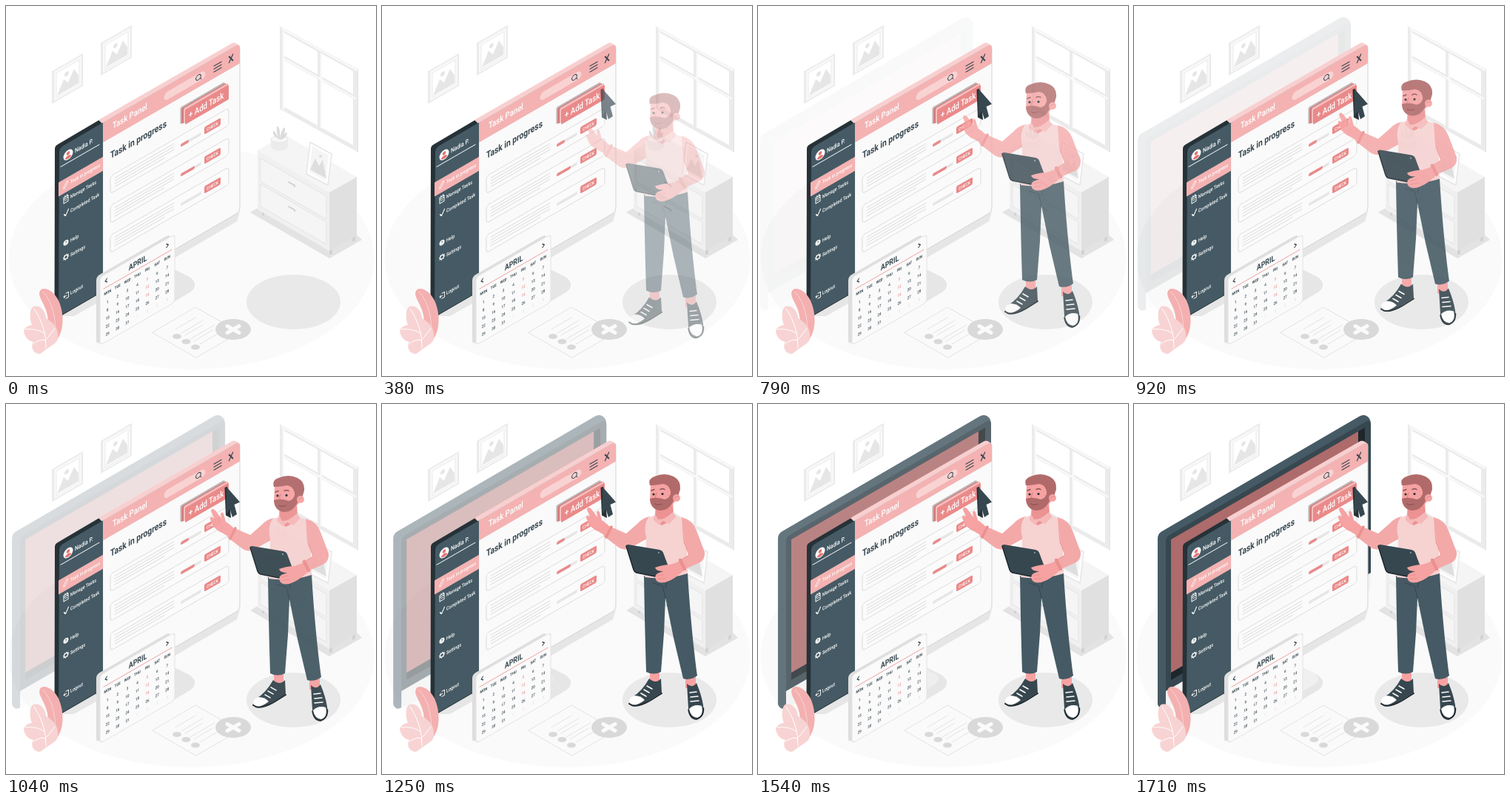
Recreate the animation shown at these times as an HTML page. Size 500 by 500 pixels, loop 1750 ms.

```html
<!DOCTYPE html>
<html lang="en">
<head>
<meta charset="utf-8">
<title>Task panel</title>
<style>
  html, body { margin: 0; width: 100%; height: 100%; overflow: hidden; background: #fff; }
  svg { display: block; width: 100%; height: 100%; }
  text { font-family: Roboto, "Liberation Sans", sans-serif; font-weight: 500; }
</style>
</head>
<body>
<svg viewBox="0 0 500 500" stroke-linecap="round" stroke-linejoin="round">
  <ellipse cx="250.500" cy="341" rx="247" ry="150" fill="#fafafa"/>

  <g id="pictures" transform="skewY(-30)"></g>

  <g id="window" transform="skewY(29)" fill="none" stroke-linejoin="miter">
    <path d="M373-175H472V-69H373ZM424-175V-69M373-138H472" stroke="#ebebeb" stroke-width="6"/>
    <path d="M375-173V-69M426-171V-72M375-137H472M373-176H474" stroke="#fafafa" stroke-width="2.500"/>
    <path d="M475.500-178V-66" stroke="#e3e3e3"/>
  </g>

  <g id="dresser">
    <path d="M330 279L437 341L481 316L474 309L437 329L340 273Z" fill="#e3e3e3"/>
    <path d="M346 276v6l3 2v-6ZM437 330v6l4-1v-6ZM468 312v7l4-2v-7Z" fill="#d2d2d2"/>
    <path d="M340 195L377 174L474 231L437 252Z" fill="#f5f5f5"/>
    <path d="M340 195L437 252V331L340 275Z" fill="#f0f0f0"/>
    <path d="M437 252L474 231V310L437 331Z" fill="#e0e0e0"/>
    <path d="M344 206L433 257V288L344 237ZM344 241L433 292V322L344 271Z" fill="#f5f5f5" stroke="#e4e4e4"/>
    <path d="M382 238l8 4.500v1.500M382 271l8 4.500v1.500" fill="none" stroke="#d0d0d0" stroke-width="2"/>
    <path d="M358 180V189Q360 196 369 196Q379 196 381 189V180Z" fill="#ebebeb"/>
    <ellipse cx="369.500" cy="180" rx="11.500" ry="4.500" fill="#f7f7f7" stroke="#e6e6e6"/>
    <path d="M371 181Q359 176 361 168Q365 171 368 179Q364 164 367 162Q371 166 370 179Q373 164 377 164Q378 172 372 180Q376 170 380 171Q380 178 371 181Z" fill="#dcdcdc"/>
    <path d="M411 184L440 200L435 242L406 227Z" fill="#fff" stroke="#e6e6e6" stroke-width="1.500"/>
    <path d="M414 189L436 202L432 236L410 224Z" fill="#f5f5f5"/>
    <path d="M411 221L418 206L423 216L428 208L433 233Z" fill="#dedede"/>
    <circle cx="425" cy="203" r="2" fill="#dedede"/>
  </g>

  <ellipse cx="388.500" cy="400" rx="63.500" ry="37" fill="#e9e9e9"/>

  <g id="sheet" fill="none" stroke="#e3e3e3">
    <path d="M198 441L256 407L316 441L257 475Z" fill="#fafafa"/>
    <path d="M237 442L266 425M249 450L282 431M262 457L291 440M242 445L266 431M254 453L279 438M229 437L256 421"/>
    <g fill="#d9d9d9" stroke="none">
      <ellipse cx="231" cy="446.500" rx="6" ry="3.600"/>
      <ellipse cx="243.500" cy="453.500" rx="6" ry="3.600"/>
      <ellipse cx="256" cy="461" rx="6" ry="3.600"/>
      <ellipse cx="307" cy="437" rx="24" ry="14"/>
    </g>
    <path d="M299 432.500L315 441.500M315 432.500L299 441.500" stroke="#fafafa" stroke-width="5"/>
  </g>

  <path d="M72 419L316 278L312 291L150 386L92 419Z" fill="#e6e6e6"/>
  <path d="M215 350L246 365Q262 375 250 386L215 407Z" fill="#e6e6e6"/>

  <g id="monitor">
    <path d="M228 357L244 364Q254 371 244 379L228 388Z" fill="#f0f0f0"/>
    <path d="M32 182Q32 175.500 37 172.500L304 17Q309 14 313 15.500Q320 18.500 320 27V240L43 410Q36 415 32 406Z" fill="#455a64"/>
    <path d="M43 185Q43 180 48 177L313 24Q320 20 320 28V230L43 390Z" fill="#37474f"/>
    <path d="M43 388L320 228V246Q320 252 316 255L43 412Z" fill="#f3f3f3"/>
    <path d="M50 183L312 32V222L50 373Z" fill="#1c262b"/>
    <path d="M50 183L303 37V217L50 363Z" fill="#ad6b6b"/>
  </g>

  <g id="panel">
    <path d="M66 193Q66 189 70 187L126 154L131 157V386L74 419Q66 422 65.500 414Z" fill="#263238"/>
    <path d="M125 154L306 50Q309 49 312 51L316 54L131 160Z" fill="#f9cfcf"/>
    <path d="M131 157.500L310 54Q316 51 316 57V272Q316 278 311 281L131 385Z" fill="#fafafa" stroke="#cfd3d5"/>
    <path d="M131 157.500L310 54Q316 51 316 57V77.500L131 184.500Z" fill="#f4b2b2"/>
    <path d="M72 198Q72 192 77 189L131 157.500V385L79 415Q72 419 71 412Z" fill="#455a64"/>
    <g id="ui" transform="skewY(-30)"></g>
  </g>

  <g id="plant">
    <path d="M62 458C79 446 80 418 71 398C64 383 49 378 46 385C42 393 53 402 56 418Q59 436 56 460Z" fill="#f4b0b0"/>
    <path d="M50 386Q70 408 66 452" fill="none" stroke="#f9d3d3"/>
    <path d="M37 406C45 403 54 412 54 422C62 426 70 434 70 444C71 452 68 455 63 458L46 470C36 470 33 460 37 454C28 452 24 445 24 437C28 433 32 431 35 431C32 424 31 410 37 406Z" fill="#f8d3d3"/>
    <path d="M38 409Q55 434 54 463M25 437Q42 435 53 443M66 436L55 450M37 456Q48 449 54 452" fill="none" stroke="#fff"/>
  </g>

  <g id="calendar" transform="skewY(-30)"></g>

  <g id="cursor">
    <path d="M295.500 113L299 111.500L303 143L304 154L297 150.500Z" fill="#263238"/>
    <path d="M298 112L316 132.500L308.500 136L312 149L306 153L302.500 142L297.500 149Z" fill="#37474f"/>
  </g>

  <g id="man">
    <path d="M362 358H375V378H362ZM410 366H424V384H410Z" fill="#f6a2a2"/>
    <g id="shoes">
      <path d="M361 371Q370 379 377 371L378 390L362 400Q345 411 337 408Q331 403 338 396Q351 389 361 371Z" fill="#37474f"/>
      <path d="M334 401Q334 397 341 394Q350 394 355 400Q345 408 337 407Q334 405 334 401Z" fill="#fff"/>
      <path d="M334 405Q343 412 362 401L378 391" fill="none" stroke="#1c262b" stroke-width="2"/>
      <path d="M412 378Q419 385 425 377Q432 394 434 407Q436 422 425 426.500Q415 425 414 411Z" fill="#37474f"/>
      <path d="M415 412Q422 405 432 408Q435 421 426 424Q417 423 415 412Z" fill="#fff"/>
      <path d="M414 413Q416 426 425 426Q435 423 434.500 411" fill="none" stroke="#1c262b" stroke-width="1.500"/>
      <path d="M354 386l7 4M350 391l7 4M358 381l7 4M416 390l9-1M417 396l10-1M417 402l11-1" fill="none" stroke="#fff" stroke-width="1.600"/>
    </g>
    <path d="M354 232L413 228C416 280 421 330 426 367Q417 374 407 371L394 316L383 262L381 310L377 362Q367 367 357 362Q355 300 354 232Z" fill="#455a64"/>
    <path d="M383 262L379 246L366 242M387 232L383 248" fill="none" stroke="#37474f"/>
    <path d="M362 152Q352 154 346 161L330 175L307 165L299 178L320 194Q330 200 340 192L362 180Z" fill="#f4a9a9"/>
    <path d="M302 178L308 166Q302 160 297 157L294 146Q291 142 290 147L291 153L283 142Q278 137 277 143L281 152Q275 149 276 154L280 163Q286 170 292 172Z" fill="#f6a2a2"/>
    <path d="M310 166L303 180" stroke="#ec8f8f" stroke-width="3.500"/>
    <path d="M360 153Q382 146 406 154Q414 170 412 190L413 229Q385 238 355 234Q357 205 357 180Q353 165 360 153Z" fill="#f6d2d1"/>
    <path d="M370 134L393 132L394 150Q385 162 378 164Q369 158 369 150Z" fill="#ec9292"/>
    <path d="M369 148L366 156L374 163L380 158L388 162L398 152L393 146Q383 156 373 156Z" fill="#f5b8b8"/>
    <path d="M330 192Q329 190 333 190L375 197Q379 198 380 201L392 233Q392 237 389 237L344 228Q341 227 340 224Z" fill="#37474f"/>
    <path d="M330 192L340 224Q341 227 344 228L389 237" fill="none" stroke="#1c262b" stroke-width="1.500"/>
    <circle cx="374" cy="201" r="1.200" fill="#78909c"/>
    <path d="M405 153Q420 157 425 171L436 200Q437 211 428 215L405 225L399 214L415 204L407 184Z" fill="#f4a9a9"/>
    <path d="M404 212L409 224Q396 236 388 239Q377 244 371 239Q367 233 372 229L380 226Q370 226 369 221Q380 217 390 217Z" fill="#f6a2a2"/>
    <path d="M372 232l10-2M373 237l10-2" stroke="#ec8f8f"/>
    <path d="M403 211L409 223" stroke="#ec8f8f" stroke-width="4.500"/>
    <path d="M408 186L415 204L402 212" fill="none" stroke="#ec9292"/>
    <g id="head">
      <path d="M363 109Q372 103 388 107L396 118V132Q386 144 375 144Q363 141 362 130Z" fill="#f6a2a2"/>
      <path d="M362 110Q359 101 368 98Q382 92 394 98Q404 103 403 115L400 125L392 131L390 118Q388 109 380 108Q370 110 362 110Z" fill="#b16a6a"/>
      <path d="M362 128Q371 125 382 129Q389 128 391 118L394 131Q388 144 375 144Q363 142 362 128Z" fill="#b16a6a"/>
      <path d="M369 135Q373 138 378 135" fill="none" stroke="#8d5252" stroke-width="1.200"/>
      <circle cx="398" cy="127" r="5" fill="#f6a2a2"/>
      <path d="M396 127q1-3 4-2" fill="none" stroke="#e08585"/>
      <path d="M364 117l4-1.500M376 115.500q3-2 6 0" fill="none" stroke="#8d5252" stroke-width="1.500"/>
      <path d="M371 120l-2 6 3 1" fill="none" stroke="#e58282" stroke-width="1.300"/>
      <circle cx="367" cy="122" r="1.600" fill="#263238"/>
      <circle cx="379" cy="121.500" r="1.600" fill="#263238"/>
    </g>
  </g>
</svg>
<script>
const $ = id => document.getElementById(id);
const DARK = '#37474f', CORAL = '#ea8a8a', PINK = '#f4b2b2';

// All helpers below draw on the skewed wall plane.
const rect = (x, y, w, h, fill, rx = 0, extra = '') =>
  `<rect x="${x}" y="${y}" width="${w}" height="${h}" rx="${rx}" fill="${fill}" ${extra}/>`;
const line = (d, color, w = 1) =>
  `<path d="${d}" fill="none" stroke="${color}" stroke-width="${w}"/>`;
const label = (x, y, s, size, fill = '#fff', anchor = 'start', weight = 500) =>
  `<text transform="translate(${x} ${y}) scale(.8 1)" font-size="${size}" fill="${fill}" ` +
  `text-anchor="${anchor}" style="font-weight:${weight}">${s}</text>`;

function picture(x) {
  return rect(x, 124, 42, 44, '#ebebeb') + rect(x + 3, 126, 37, 40, '#f8f8f8') +
    rect(x + 6, 130, 31, 33, '#fff', 0, 'stroke="#ececec"') +
    `<path d="M${x + 7} 161l9-17 6 8 8-14 6 12v11z" fill="#e6e6e6"/>` +
    `<circle cx="${x + 20}" cy="139" r="3" fill="#e6e6e6"/>`;
}

function card(i) {
  const y = 311.5 + i * 40, done = [9, 17, 0][i];
  let s = rect(141, y, 160, 23.5, '#fbfbfb', 4, 'stroke="#dcdcdc"');
  for (let k = 0; k < 4; k++) s += line(`M147 ${y + 5.5 + k * 4}H${k < 3 ? 227 : 214}`, '#dadada');
  s += line(`M238 ${y + 13.5}H262`, '#e6e6e6', 4);
  if (done) s += line(`M238 ${y + 13.5}h${done - 2}`, CORAL, 4);
  return s + rect(268, y + 7, 22, 10, CORAL, 2) + label(279, y + 14.3, 'CHECK', 6, '#fff', 'middle');
}

function sidebar() {
  return '<circle cx="84" cy="249.500" r="6.500" fill="#fff"/>' +
    `<circle cx="84" cy="247.500" r="2.300" fill="#e57373"/><path d="M79.500 253q4.500-5 9 0q-4.500 4-9 0" fill="#e57373"/>` +
    label(93, 252.5, 'Nadia P.', 8.5) + line('M74 260H126', '#fff') +
    rect(71, 279.5, 60, 19, PINK) +
    label(87, 290.5, 'Task in progress', 6.8) +
    label(87, 310.5, 'Manage Tasks', 6.8) +
    label(87, 329.5, 'Completed Task', 6.8) +
    label(87, 369.5, 'Help', 6.8) +
    label(87, 389, 'Settings', 6.8) +
    label(87, 440.5, 'Logout', 6.8) +
    line('M78 290l4-6 2 1.500-4 6-2 1z', '#fff', .8) +
    line('M78 304h6v8h-6zM78 306.500h6M80 309h2M80 302.500v2M82.500 302.500v2', '#fff', 1) +
    line('M78.500 327l2 3 4-7', '#fff', 1.3) +
    '<circle cx="81" cy="366.500" r="3.500" fill="#fff"/>' + label(81, 369, '?', 6.5, '#455a64', 'middle') +
    '<circle cx="81" cy="386" r="2.600" fill="none" stroke="#fff" stroke-width="1.500"/>' +
    '<circle cx="81" cy="386" r="3.700" fill="none" stroke="#fff" stroke-width="1" stroke-dasharray="1 1.900" stroke-linecap="butt"/>' +
    line('M81 435h3.500v7h-3.500M82 438.500h-4l1.500-1.500M78 438.500l1.500 1.500', '#fff', .9);
}

function board() {
  return label(144, 249.5, 'Task Panel', 12) +
    line('M219 247H264', '#f9d2d2', 11) +
    '<circle cx="260" cy="246.500" r="3.400" fill="none" stroke="#37474f" stroke-width="1"/>' +
    line('M262.400 249l1.600 2', DARK, 1) +
    line('M281 243.300H291M281 247.300H291M281 251.300H291', DARK, 1.3) +
    line('M301.500 242.500l5 8M306.500 242.500l-5 8', DARK, 1.6) +
    label(141, 288, 'Task in progress', 12.8, DARK, 'start', 700) +
    [0, 1, 2].map(card).join('') +
    rect(235.5, 273, 60, 23, '#bdb3b4', 2) + rect(237.5, 275.5, 60, 21, '#d57878', 2) +
    rect(240, 277, 60, 20, '#f6bebe', 2) + rect(242, 280, 59, 20, CORAL, 1.5) +
    label(247, 294.3, '+ Add Task', 12);
}

function calendar() {
  const names = ['MON', 'TUE', 'WED', 'THU', 'FRI', 'SAT', 'SUN'];
  let s = rect(122, 436, 100, 92, '#dedede', 5) +
    rect(127, 440, 101, 92, '#fafafa', 5, 'stroke="#e3e3e3"') +
    label(178, 453.5, 'APRIL', 11, DARK, 'middle', 700) +
    line('M132 458.500H224', '#f0a0a0') +
    line('M136.500 447l-2.500 2.300 2.500 2.300M217 447l2.500 2.300-2.500 2.300', DARK, 1.2);
  names.forEach((n, c) => s += label(137.3 + c * 13.4, 468, n, 5.3, DARK, 'middle', 700));
  for (let i = 0; i < 35; i++) {
    const col = i % 7, row = i / 7 | 0, next = i > 30;
    const color = next ? '#e0e0e0' : col === 4 && row < 3 ? '#f08a8a' : DARK;
    s += label(137.3 + col * 13.4, 481 + row * 10.8, next ? i - 30 : i + 1, 5.5, color, 'middle');
  }
  return s;
}

$('pictures').innerHTML = picture(62) + picture(128);
$('ui').innerHTML = sidebar() + board();
$('calendar').innerHTML = calendar();

const LOOP = 1750;
const clamp = v => Math.min(1, Math.max(0, v));

// Cubic Bezier (.42, 0, .85, 1), solved by bisection.
function ease(u) {
  let lo = 0, hi = 1, s = .5;
  for (let i = 0; i < 20; i++) {
    s = (lo + hi) / 2;
    const r = 1 - s, x = 1.26 * r * r * s + 2.55 * r * s * s + s * s * s;
    if (x < u) lo = s; else hi = s;
  }
  return s * s * (3 - 2 * s);
}

function place(id, p, dx, dy) {
  $(id).setAttribute('opacity', p.toFixed(3));
  $(id).setAttribute('transform', `translate(${(dx * (1 - p)).toFixed(2)} ${(dy * (1 - p)).toFixed(2)})`);
}

function draw(t) {
  const shown = t >= 80;
  place('cursor', shown ? clamp(t / 580) : 0, 0, 0);
  place('man', shown ? 1 - Math.pow(1 - clamp(t / 1200), 1.5) : 0, 0, 40);
  place('monitor', ease(clamp((t - 660) / 1060)), -30, 0);
}

const start = performance.now();
function tick() {
  draw((performance.now() - start) % LOOP);
  requestAnimationFrame(tick);
}
tick();
</script>
</body>
</html>
```
